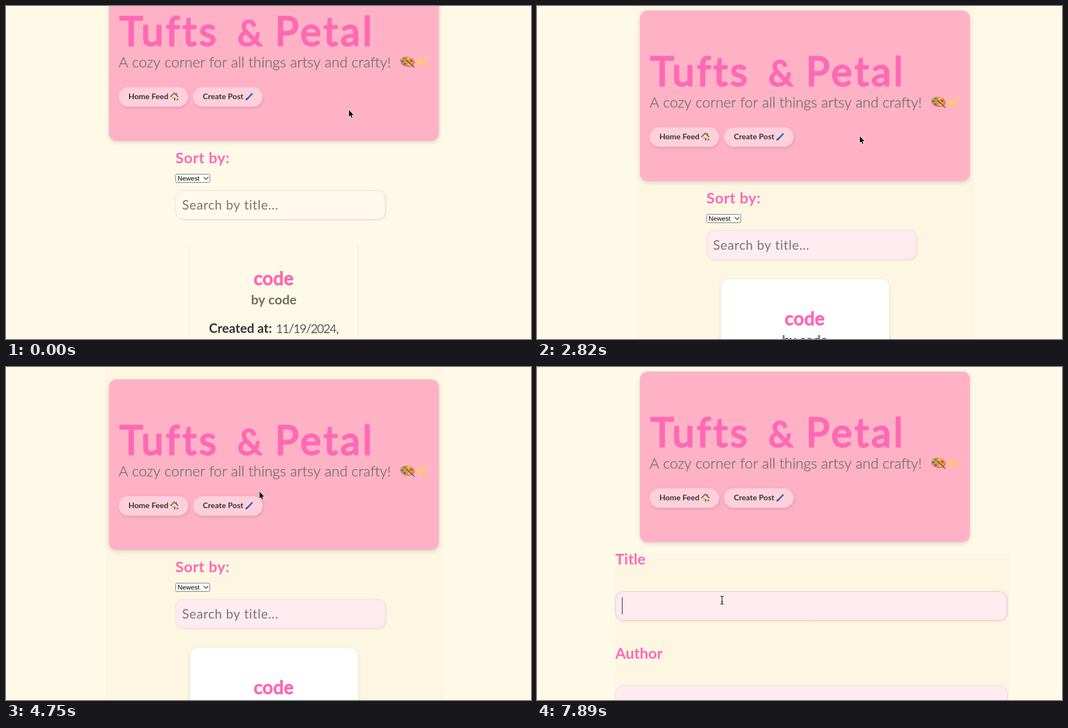
Write an HTML page with a canvas that moves like this. It is 939x597 px and loops after 8 s.

```html
<!DOCTYPE html>
<html lang="en">
<head>
<meta charset="utf-8">
<title>Craft blog walkthrough</title>
<style>
html, body { margin: 0; width: 100%; height: 100%; overflow: hidden; background: #fff9e8; }
canvas { display: block; width: 939px; height: 597px; }
</style>
</head>
<body>
<canvas id="stage" width="939" height="597"></canvas>
<script>
const ctx = document.getElementById('stage').getContext('2d');
const LOOP = 8000;
const PINK = '#ff69b4', CREAM = '#fff9e8', TINT = '#fdf6e3', OLIVE = '#6b705c';
const LATO = 'Lato, sans-serif', INTER = 'Inter, sans-serif';

// Each entry holds from its time until the next one: [ms, value...]
const SCROLL = [
  [0, 72], [140, 24], [290, -22], [440, -9], [590, -3.5], [740, -2], [890, -1], [1040, -0.5], [1180, 0],
  [4010, 155], [4160, 110], [4300, -8], [4450, -71], [4600, -36], [4750, -14], [4890, -4], [5040, 0]
];
const CURSOR = [
  [0, 613, 186, 'arrow'], [290, 613, 188, 'beam'], [740, 613, 192, 'arrow'], [1040, 613, 240, 'arrow'],
  [1320, 622, 262, 'arrow'], [1470, 618, 290, 'arrow'], [1620, 590, 280, 'arrow'], [1770, 567, 256, 'arrow'],
  [1920, 570, 238, 'arrow'], [2070, 577, 233, 'arrow'], [3410, 530, 130, 'arrow'], [3560, 470, 62, 'arrow'],
  [3710, 453, 223, 'arrow'], [5190, 400, 226, 'arrow'], [5340, 363, 231, 'arrow'], [7290, 358, 290, 'arrow'],
  [7440, 342, 372, 'arrow'], [7590, 331, 412, 'beam'], [7740, 331, 418, 'beam']
];
const RICH = [[0, false], [140, true], [4010, false], [4160, true], [5190, false], [6990, true]];
const BUTTON = [[0, '#ffd0dc'], [6540, '#ffc8d6'], [6690, '#ffc0d0'], [7290, '#ffd0dc']];

const at = (list, t) => list.filter(e => e[0] <= t).pop();

function box(x, y, w, h, r, fill, stroke) {
  ctx.beginPath();
  ctx.roundRect(x, y, w, h, r);
  if (fill) { ctx.fillStyle = fill; ctx.fill(); }
  if (stroke) { ctx.strokeStyle = stroke; ctx.lineWidth = 1; ctx.stroke(); }
}

function shadowed(color, blur, dy, draw, dx = 0) {
  ctx.save();
  ctx.shadowColor = color;
  ctx.shadowBlur = blur;
  ctx.shadowOffsetX = dx;
  ctx.shadowOffsetY = dy;
  draw();
  ctx.restore();
}

// bold > 0 thickens the letters with a rounded outline
function text(str, x, y, font, color, { align = 'left', gap = 0, bold = 0 } = {}) {
  ctx.font = font;
  ctx.textAlign = align;
  ctx.letterSpacing = gap + 'px';
  ctx.fillStyle = ctx.strokeStyle = color;
  ctx.fillText(str, x, y);
  if (bold) {
    ctx.lineWidth = bold;
    ctx.lineJoin = ctx.lineCap = 'round';
    ctx.strokeText(str, x, y);
  }
}

function poly(points, fill) {
  ctx.beginPath();
  points.forEach(([x, y]) => ctx.lineTo(x, y));
  ctx.closePath();
  ctx.fillStyle = fill;
  ctx.fill();
}

function line(points, color, width) {
  ctx.beginPath();
  points.forEach(([x, y], i) => i ? ctx.lineTo(x, y) : ctx.moveTo(x, y));
  ctx.strokeStyle = color;
  ctx.lineWidth = width;
  ctx.stroke();
}

function dot(x, y, rx, ry, color, turn = 0) {
  ctx.beginPath();
  ctx.ellipse(x, y, rx, ry, turn, 0, Math.PI * 2);
  ctx.fillStyle = color;
  ctx.fill();
}

function star(x, y, r) {
  ctx.beginPath();
  ctx.moveTo(x, y - r);
  for (let i = 1; i <= 4; i++) {
    const a = i * Math.PI / 2 - Math.PI / 2;
    const m = a - Math.PI / 4;
    ctx.quadraticCurveTo(x + Math.cos(m) * r * 0.18, y + Math.sin(m) * r * 0.18,
      x + Math.cos(a) * r, y + Math.sin(a) * r);
  }
  ctx.fillStyle = '#ffd257';
  ctx.fill();
}

function paintPalette() {
  dot(718, 172, 13, 9, '#c98235', 0.2);
  dot(717.5, 171, 12, 8, '#dc9a47', 0.2);
  dot(722, 177, 3, 2, '#ffb2c5');
  [[709, 171, '#3b73d1'], [713, 166, '#4aa54a'], [720, 166, '#f0d040'],
   [725, 170, '#d9443a'], [713, 176, '#8a4bb0']].forEach(([x, y, c]) => dot(x, y, 2.4, 2, c));
  line([[716, 169], [730, 182]], '#70431f', 1.5);
}

function paintHouse() {
  box(296.5, 233, 9.5, 8, 0, '#f0dfc0');
  line([[294.5, 234.5], [301, 228], [307.5, 234.5]], '#8b5b43', 1.8);
  box(304, 228, 1.6, 4, 0, '#8b5b43');
  box(300.5, 236.5, 2.5, 4.5, 0, '#8a5a40');
  box(297.5, 235.5, 2, 2, 0, '#6f9ab8');
  dot(306.5, 239.5, 1.8, 2, '#6d9c4c');
}

function paintPen() {
  line([[431, 239], [440, 229.5]], '#2b62c9', 2.8);
  line([[433, 235], [438, 229.5]], '#6d9bea', 1);
  poly([[429.5, 237], [432, 239.5], [428, 241.5]], '#3a3a42');
}

function paintHeader(buttonFill) {
  shadowed('rgba(0,0,0,.11)', 6, 3.5, () => box(184, 8, 590.5, 306, 14, '#ffb2c6'));
  const big = '400 71px ' + LATO, style = { gap: 4.5, bold: 2.8 };
  text('Tufts', 203, 143, big, PINK, style);
  text('&', 414, 143, '400 62px ' + LATO, PINK, style);
  text('Petal', 481, 143, big, PINK, style);
  text('A cozy corner for all things artsy and crafty!', 201.5, 182, '300 26px ' + LATO, OLIVE, { bold: .3 });
  paintPalette();
  star(742, 173, 9);
  star(751, 166, 4.5);
  star(751.5, 180, 4);
  [[201.5, 'Home Feed', '#ffd0dc'], [334.5, 'Create Post', buttonFill]].forEach(([x, label, fill]) => {
    shadowed('rgba(0,0,0,.13)', 5, 2, () => box(x, 217.5, 124.5, 35, 17.5, fill), 1);
    text(label, x + 17.5, 239, '700 14px ' + LATO, '#333');
  });
  paintHouse();
  paintPen();
}

function paintField(x, y, w, rich, border) {
  shadowed('rgba(120,70,60,.17)', 3, 1, () => box(x + .5, y + .5, w, 52, 14, rich ? '#feecf0' : '#fff9eb'), 1);
  box(x + .5, y + .5, w, 52, 14, null, border);
}

function paintCard(rich) {
  if (rich) {
    shadowed('rgba(0,0,0,.11)', 6, 3, () => box(329.5, 490, 300, 420, 14, '#fff'));
  } else {
    ctx.fillStyle = '#f4eddb';
    ctx.fillRect(327.5, 500, 1.8, 400);
    ctx.fillRect(629.2, 500, 1.8, 400);
  }
  const mid = { align: 'center', bold: .4 };
  const thin = '300 21.5px ' + LATO;
  text('code', 479, 572, '400 32.5px ' + LATO, PINK, { align: 'center', gap: .6, bold: 1.9 });
  text('by code', 479, 607, '700 23.5px ' + LATO, OLIVE, { align: 'center' });
  text('Created at:', 363, 658, '700 23px ' + LATO, '#333');
  text('11/19/2024,', 483, 658, thin, '#333', { gap: -1.1, bold: .4 });
  text('8:30:00 PM', 479, 687, thin, '#333', { ...mid, gap: -.6 });
  text('Upvotes: 7', 479, 738, thin, '#333', mid);
}

function paintFeed(rich) {
  text('Sort by:', 303, 353.5, '700 27px ' + LATO, PINK, { gap: .5 });
  box(303.5, 373.5, 61, 15, 2, '#fffefa', '#767676');
  text('Newest', 307, 385, '11.7px "Liberation Sans", Arial, sans-serif', '#000');
  line([[354, 379], [357.7, 382.8], [361.4, 379]], '#222', 1.1);
  paintField(303, 402, 375, rich, '#fbd6d8');
  text('Search by title...', 315, 437, '400 23px ' + LATO, '#757575', { gap: .7 });
  paintCard(rich);
}

function paintForm(focused) {
  const label = '700 27px ' + LATO;
  text('Title', 140, 353.5, label, PINK);
  paintField(140, 402, 700, true, focused ? '#f9b9cb' : '#fbd6d8');
  text('Author', 140, 523, label, PINK);
  paintField(140, 571, 700, true, '#fbd6d8');
  if (focused) line([[152.5, 413], [152.5, 443]], '#333', 1.2);
}

function paintDialog() {
  shadowed('rgba(40,20,30,.48)', 42, 13, () => box(485, 10, 229, 288.5, 11, '#f5d3e3'));
  box(485, 10, 229, 288.5, 11, '#f5d3e3', 'rgba(90,50,70,.45)');
  box(573, 30, 47, 47, 10, '#1e8bff');
  box(603, 56, 24, 25, 6, '#f5473f');
  const mid = { align: 'center' };
  ['“MOTHrec” is requesting to', 'bypass the system private', 'window picker and directly',
   'access your screen and audio.'].forEach((s, i) =>
    text(s, 599, 112.5 + i * 14.2, '700 11.6px ' + INTER, '#36142a', mid));
  ['This will allow MOTHrec to record your', 'screen and system audio, including',
   'personal or sensitive information that', 'may be visible or audible.'].forEach((s, i) =>
    text(s, 599, 176.3 + i * 12.3, '400 9.75px ' + INTER, '#36142a', mid));
  const violet = ctx.createLinearGradient(0, 230, 0, 254);
  violet.addColorStop(0, '#aa2db3');
  violet.addColorStop(1, '#9a10a2');
  box(499, 230, 201, 24.5, 5, violet);
  text('Allow', 599, 246, '400 11.4px ' + INTER, '#fff', mid);
  box(499, 260, 201, 24.5, 5, '#dbbac9');
  text('Open System Settings', 599, 276, '400 11.3px ' + INTER, '#3d2735', mid);
}

function paintCursor([, x, y, kind]) {
  ctx.save();
  ctx.translate(x, y);
  ctx.lineJoin = 'round';
  if (kind === 'arrow') {
    const shape = [[.5, .5], [.5, 12.4], [3.1, 10.1], [5, 14.6], [6.8, 13.8], [5, 9.4], [8.6, 9.2]];
    line([...shape, shape[0]], '#fff', 1.6);
    poly(shape, '#000');
  } else {
    [['rgba(255,255,255,.7)', 2.6], ['#111', 1.2]].forEach(([color, width]) => {
      line([[-3, -7], [-1, -7], [0, -6], [1, -7], [3, -7]], color, width);
      line([[0, -6], [0, 6]], color, width);
      line([[-3, 7], [-1, 7], [0, 6], [1, 7], [3, 7]], color, width);
      line([[-1.5, 2.5], [1.5, 2.5]], color, width);
    });
  }
  ctx.restore();
}

function paint(t) {
  const rich = at(RICH, t)[1];
  const form = t >= 6990;
  ctx.fillStyle = CREAM;
  ctx.fillRect(0, 0, 939, 597);
  if (rich) {
    ctx.fillStyle = TINT;
    if (form) ctx.fillRect(139, 334, 706, 263);
    else ctx.fillRect(177, 0, 606, 597);
  }
  ctx.save();
  ctx.translate(0, -at(SCROLL, t)[1]);
  paintHeader(at(BUTTON, t)[1]);
  if (form) paintForm(t >= 7890);
  else paintFeed(rich);
  ctx.restore();
  if (t >= 440 && t < 2670) paintDialog();
  paintCursor(at(CURSOR, t));
}

const start = performance.now();
function tick() {
  paint((performance.now() - start) % LOOP);
  requestAnimationFrame(tick);
}
tick();
</script>
</body>
</html>
```
